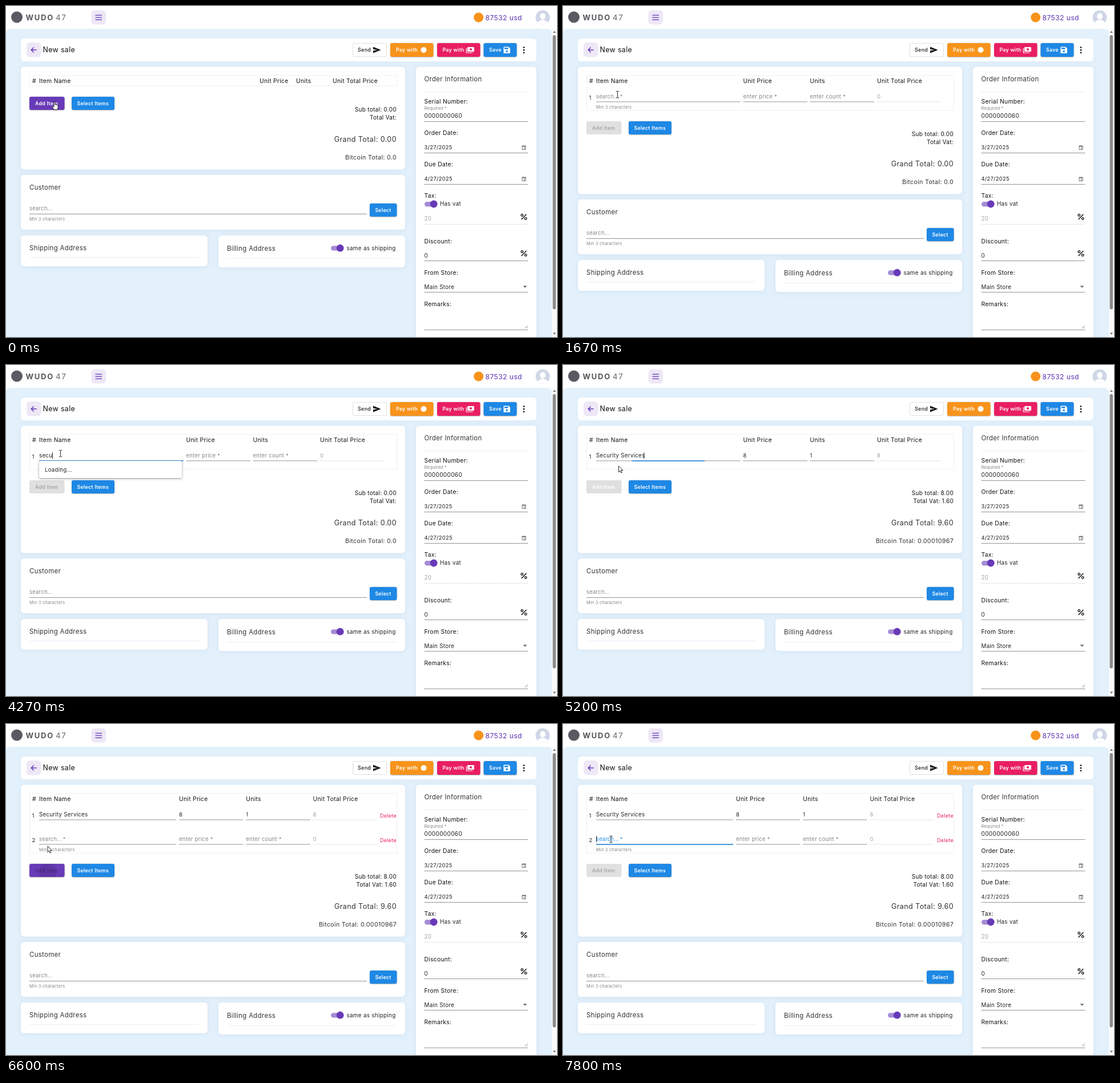
These frames come from a looping animation (965 px wide and 580 px high, 8 s). An HTML page:

```html
<!DOCTYPE html>
<html lang="en">
<head>
<meta charset="utf-8">
<title>New sale</title>
<style>
html, body { margin: 0; width: 100%; height: 100%; overflow: hidden; background: #fff; }
svg { display: block; }
text { font-family: Inter, "Open Sans", sans-serif; letter-spacing: .03em; white-space: pre; }
.card { fill: #fff; filter: drop-shadow(0 1px 5px rgba(32, 60, 100, .08)); }
.bar { fill: #fff; filter: drop-shadow(0 1px 4px rgba(32, 60, 100, .03)); }
.raised { filter: drop-shadow(0 1px .6px rgba(0, 0, 0, .2)) drop-shadow(0 .6px 1.4px rgba(0, 0, 0, .18)); }
.panel { fill: #fff; filter: drop-shadow(0 1.2px 1px rgba(0, 0, 0, .25)) drop-shadow(0 1px 2.4px rgba(0, 0, 0, .22)); }
</style>
</head>
<body>
<svg id="stage" width="965" height="580" viewBox="0 0 965 580">
  <g id="fixed"></g>
  <g id="live"></g>
</svg>
<script>
const LOOP = 8000;
const INK = '#212121', GREY = '#858585', PALE = '#a3a3a3', RULE = '#949494', FAINT = '#ebeef2';
const BLUE = '#1e88e5', PURPLE = '#673ab7', PINK = '#e91e63', ORANGE = '#f7931a';

// Moments of the story
const ADD1 = 930, FOCUS1 = 1930, TYPE = 2730, LIST = 4270, FOUND = 4400,
      PICK = 5200, ADD2 = 6600, FOCUS2 = 7470;
const TYPED = [[TYPE, 's', 63.5], [2870, 'se', 69.3], [3270, 'sec', 75], [LIST, 'secu', 81], [PICK, 'Security Services', 141.5]];
const CARET_ON = [[FOCUS1, 2530], [TYPE, 3800], [LIST, 4800], [PICK, 5730], [6270, ADD2], [FOCUS2, LOOP]];
const POINTER = [
  [0, 85, 168], [1270, 85, 168], [1400, 86, 167], [1600, 86, 167], [1670, 95.5, 155],
  [4600, 95.5, 155], [5000, 97.5, 177], [5930, 97, 176.5], [6400, 73, 214],
  [7060, 73, 214], [7200, 84, 202], [LOOP, 84, 202]
];

// Drawing helpers; text y is the middle of the line
const text = (x, y, s, size = 9.8, o = {}) =>
  `<text x="${x}" y="${y + size * .36}" font-size="${size}" font-weight="${o.w || 400}" fill="${o.c || INK}" text-anchor="${o.a || 'start'}"${o.ls ? ` style="letter-spacing:${o.ls}px"` : ''}>${s}</text>`;
const rect = (x, y, w, h, fill, r = 0, more = '') =>
  `<rect x="${x}" y="${y}" width="${w}" height="${h}" rx="${r}" fill="${fill}" ${more}/>`;
const card = (x, y, w, h, kind = 'card') => rect(x, y, w, h, '#fff', 6, `class="${kind}"`);
const path = (d, fill, more = '') => `<path d="${d}" fill="${fill}" ${more}/>`;
const stroke = (d, color, width = 1, more = '') =>
  path(d, 'none', `stroke="${color}" stroke-width="${width}" ${more}`);
const circle = (x, y, r, fill) => `<circle cx="${x}" cy="${y}" r="${r}" fill="${fill}"/>`;
const rule = (x1, x2, y, color = RULE) => stroke(`M${x1} ${y}H${x2}`, color);
const dots = (x1, x2, y) => stroke(`M${x1} ${y}H${x2}`, '#b5b5b5', 1, 'stroke-dasharray="1 1.9"');
const group = (x, y, s) => `<g transform="translate(${x} ${y})">${s}</g>`;
const label = (x, y, s) => text(x, y, s, 10.3, { c: '#111' });
const title = (x, y, s) => text(x, y, s, 11.4, { c: '#333' });
const hint = (x, y, s) => text(x, y, s, 7.4, { c: GREY });
const bold = (x, y, s, c = '#fff', a = 'start') => text(x, y, s, 8.8, { w: 600, c, a });
const button = (x, y, w, h, fill) => rect(x, y, w, h, fill, 3, 'class="raised"');
const toggle = (x, y) => rect(x, y - 4, 21, 8.4, '#a58bd6', 4.2) + circle(x + 16.2, y, 6.4, PURPLE);

const clamp = p => Math.max(0, Math.min(1, p));
const easeOut = (p, n) => 1 - (1 - clamp(p)) ** n;

const calendar = y => group(903.5, y - 4,
  stroke('M.5 1.4H6.7V7.6H.5Z', '#555', .8) + path('M.5 1.2H6.7V2.6H.5ZM1.4 0H2.2V2H1.4ZM5 0H5.8V2H5ZM3.6 4.4H5.4V6.2H3.6Z', '#555'));
const percent = y => group(907, y,
  stroke('M4.4 -4.6L-4.4 4.6', '#111', 1.4) + stroke('M-5 -3a1.8 1.8 0 1 0 3.6 0a1.8 1.8 0 1 0 -3.6 0M1.4 3a1.8 1.8 0 1 0 3.6 0a1.8 1.8 0 1 0 -3.6 0', '#111', 1.3));

function header() {
  return circle(19, 19.5, 10, '#5a5a62') +
    text(34.5, 20, 'WUDO', 13, { w: 700, c: '#55555d', ls: 1.8 }) +
    text(87, 20, '47', 13, { w: 500, c: '#77777f', ls: 1.8 }) +
    rect(149.5, 7.5, 25.5, 25, '#ede7f6', 6) +
    stroke('M156.5 16.2H168M156.5 20.2H168M156.5 24.2H168', '#5e35b1', 1.3) +
    circle(827.7, 20, 8.5, ORANGE) +
    text(839.5, 20.2, '87532 usd', 12.2, { c: '#5e35b1' }) +
    circle(940, 20, 12.5, '#cfd6e6') +
    `<ellipse cx="940" cy="18" rx="4.8" ry="5.8" fill="#fff"/>` +
    path('M931.5 29Q933 24.6 940 24.2Q947 24.6 948.5 29A12.5 12.5 0 0 1 931.5 29Z', '#fff');
}

function toolbar() {
  return card(26, 57, 903, 40, 'bar') +
    rect(36, 64, 25.5, 25.5, '#ede7f6', 6) +
    stroke('M53.5 77H44.5M48.6 72.6L44.2 77L48.6 81.4', '#5e35b1', 1.4) +
    text(64.5, 76.8, 'New sale', 12.4, { c: '#111' }) +
    rect(607.5, 65.5, 59, 23, '#fff', 2, 'stroke="#e0e0e0"') +
    text(616, 77, 'Send', 9, { w: 500 }) + path('M643 71.5L656.5 77L643 82.5V78.2L651 77L643 75.8Z', '#111') +
    button(673, 65, 75.5, 24, ORANGE) + bold(683, 77, 'Pay with') + circle(731.5, 77, 5, '#fff') +
    button(755, 65, 75.5, 24, PINK) + bold(764.5, 77, 'Pay with') +
    rect(808, 72, 12, 8, '#fff', 1) + circle(814, 76, 2.1, PINK) +
    stroke('M806.3 74V82H817.5', '#fff', 1.2) +
    button(836.5, 65, 58, 24, BLUE) + bold(846, 77, 'Save') +
    path('M872.6 71.4H880.2L883 74.2V82.8H871.4V72.6Z', '#fff') +
    rect(873, 73, 6.4, 2.6, BLUE) + circle(877.2, 79.3, 1.8, BLUE) +
    [72.6, 77.2, 81.8].map(y => circle(907, y, 1.4, '#111')).join('');
}

function order() {
  const x = 732.5, end = 914.5;
  return card(718, 106.5, 211, 500) +
    title(x, 128, 'Order Information') + rule(x, end, 150.5, FAINT) +
    label(x, 167.5, 'Serial Number:') + hint(x, 179, 'Required *') +
    text(x, 192.5, '0000000060', 10.1) + rule(x, end, 202.5) +
    label(x, 222.5, 'Order Date:') + text(x, 247.5, '3/27/2025', 9.4) + calendar(248) + rule(x, end, 257.5) +
    label(x, 277.5, 'Due Date:') + text(x, 302.5, '4/27/2025', 9.4) + calendar(303) + rule(x, end, 312.5) +
    label(x, 332.5, 'Tax:') + toggle(733, 347) + text(760, 346.8, 'Has vat') +
    text(x, 372.7, '20', 9.8, { c: PALE }) + percent(369.5) + dots(x, end, 382.5) +
    label(x, 412, 'Discount:') + text(x, 437, '0', 9.8) + percent(433.5) + rule(x, end, 446.5) +
    label(x, 467, 'From Store:') + text(x, 492, 'Main Store', 9.8) +
    path('M905.6 490.2H912.4L909 493.8Z', '#666') + rule(x, end, 501.5) +
    label(x, 522, 'Remarks:') + stroke('M908.6 565L913.6 560M911.4 565L913.6 562.8', '#777', .8) + rule(x, end, 567.5);
}

document.getElementById('fixed').innerHTML =
  rect(0, 0, 965, 580, '#fff') +
  path('M0 580V48Q0 40 8 40H948Q956 40 956 48V580Z', '#e3f1fc') +
  rect(956, 40, 9, 540, '#fafafa') +
  rect(957.5, 51, 5.6, 480.5, '#8b8b8b', 2.8) +
  path('M957.8 47L960.5 43.4L963.2 47ZM957.8 572.5H963.2L960.5 576.1Z', '#777') +
  header() + toolbar() + order();

// Column starts: name, price, units, total; and field ends
const EMPTY = { at: [58, 444, 508, 572] };
const SINGLE = { at: [58, 315.5, 432.5, 550], to: [310.5, 428, 545, 662] };
const DOUBLE = { at: [58, 303, 420.3, 537.5], to: [298, 415.3, 532.5, 648.5] };

function row(n, y, cols, r) {
  const { at, to } = cols;
  const soft = s => ({ c: s ? INK : GREY });
  const tint = { c: r.focus >= 0 ? BLUE : GREY };
  let s = text(45.5, y + 2.3, n, 9.6) + rule(at[0], to[0], y + 9.7);
  if (r.name) s += text(at[0], y, r.name, 9.7);
  else s += text(at[0], y, 'search...', 9.2, tint) + text(99.8, y, '*', 9.2, tint) +
    hint(at[0], y + 19, 'Min 3 characters');
  s += text(at[1], y, r.price || 'enter price *', 9.5, soft(r.price)) + rule(at[1], to[1], y + 9.7);
  s += text(at[2], y, r.units || 'enter count *', 9.5, soft(r.units)) + rule(at[2], to[2], y + 9.7);
  s += text(at[3], y, r.price || '0', 9.5, { c: PALE }) + dots(at[3], to[3], y + 9.7);
  if (cols === DOUBLE) s += text(655, y + 2.7, 'Delete', 9, { c: PINK });
  if (r.focus >= 0) {
    const half = (to[0] - at[0]) / 2 * (.5 + .5 * easeOut(r.focus / 300, 3)), mid = (at[0] + to[0]) / 2;
    s += stroke(`M${mid - half} ${y + 9.8}H${mid + half}`, BLUE, 1.5);
  }
  if (r.caret) s += rect(r.caret, y - 5, 1, 11, '#222');
  return s;
}

// How far the Add button has faded to its disabled look
function fade(t) {
  if (t >= ADD2) return easeOut((t - ADD2) / 400, 2);
  if (t >= PICK) return 1 - easeOut((t - PICK) / 300, 2);
  return easeOut((t - ADD1) / 400, 2);
}

function addButton(t, y) {
  const f = fade(t), off = (t >= ADD1 && t < PICK) || t >= ADD2;
  const mix = (a, b) => Math.round(a + (b - a) * f);
  const fill = `rgb(${mix(103, 224)},${mix(58, 224)},${mix(183, 224)})`;
  const [since, cx, cy] = t >= ADD2 ? [t - ADD2, 32, 14] : [t - ADD1, 44, 11];
  let wave = '';
  if (since >= 0 && since < 450)
    wave = circle(cx, cy, 15 + 50 * easeOut(since / 225, 2), `rgba(0,0,0,${.1 * (1 - since / 450)})`);
  return rect(41, y, 61.5, 23, fill, 3, f < .6 ? 'class="raised"' : '') +
    `<svg x="41" y="${y}" width="61.5" height="23">${wave}</svg>` +
    bold(51, y + 11.5, 'Add Item', off ? 'rgba(0,0,0,.26)' : '#fff');
}

function cursor(t) {
  const i = POINTER.findIndex(p => p[0] > t), [t0, x0, y0] = POINTER[i - 1], [t1, x1, y1] = POINTER[i];
  const p = (t - t0) / (t1 - t0), k = p * p * (3 - 2 * p);
  const x = x0 + (x1 - x0) * k, y = y0 + (y1 - y0) * k;
  const edge = 'stroke="#111" stroke-width=".9" stroke-linejoin="round"';
  const beam = (t >= ADD1 && t < PICK && y < 167) || (t > 7000 && y < 211);
  const hand = t < ADD1 || (t > 4600 && t < PICK) || (t >= 6000 && t < ADD2 && y > 202);
  if (beam) return group(x, y,
    stroke('M-2.6 -5.6H-.7L0 -5L.7 -5.6H2.6M0 -5V5M-2.6 5.6H-.7L0 5L.7 5.6H2.6', '#222', 1));
  if (hand) return group(x, y, path(
    'M-1 1Q-1 -.2 0 -.2T1 1V5Q1.2 4.2 2 4.4T2.8 5.4Q3.2 4.7 3.9 5T4.5 6Q5 5.4 5.6 5.8T6.2 7V9.5L5 13.8H-.8L-3.6 9.2Q-4.2 7.8 -3.2 7.5T-1 9Z', '#fff', edge));
  return group(x, y, path('M0 0V10.6L2.5 8.3L4.2 12L5.9 11.2L4.3 7.6H7.6Z', '#fff', edge));
}

function items(t, d) {
  const cols = t < ADD1 ? EMPTY : t < ADD2 ? SINGLE : DOUBLE;
  const picked = t >= PICK;
  const last = TYPED.filter(k => t >= k[0]).pop();
  const blink = CARET_ON.some(([a, b]) => t >= a && t < b);
  let s = card(26, 106.5, 673, 180 + d) +
    rect(41.5, 121.5, 643, 18.5 + d, 'none', 0, 'stroke="#f0f0f0"') + label(46, 130.8, '#') +
    ['Item Name', 'Unit Price', 'Units', 'Unit Total Price'].map((h, i) => label(cols.at[i], 130.8, h)).join('');
  if (t >= ADD1) s += row(1, 158.2, cols, {
    name: last && last[1], price: picked && '8', units: picked && '1',
    focus: t < ADD2 ? t - (picked ? PICK : FOCUS1) : -1,
    caret: blink && t < ADD2 && (last ? last[2] : 58)
  });
  if (t >= ADD2) s += row(2, 201.2, cols, { focus: t - FOCUS2, caret: blink && 58 });
  const sum = (y, str, size, c = '#333') => text(684, y + d, str, size, { a: 'end', c });
  return s + addButton(t, 159 + d) +
    button(115, 159 + d, 75, 23, BLUE) + bold(124.5, 170.5 + d, 'Select Items') +
    sum(181.3, 'Sub total: ' + (picked ? '8.00' : '0.00'), 10, '#111') +
    sum(195.7, 'Total Vat:' + (picked ? ' 1.60' : ''), 10, '#111') +
    sum(233.2, 'Grand Total: ' + (picked ? '9.60' : '0.00'), 12.6) +
    sum(264.7, 'Bitcoin Total: ' + (picked ? '0.00010967' : '0.0'), 10.7);
}

function lower() {
  return card(26, 296, 673, 96) + title(41, 317.5, 'Customer') +
    text(41, 355, 'search...', 9.4, { c: GREY }) + rule(41, 632, 364.5) + hint(41, 373.7, 'Min 3 characters') +
    button(637, 346, 47.5, 23, BLUE) + bold(660.5, 357.5, 'Select', '#fff', 'middle') +
    card(26, 402, 327, 54) + title(41, 423.5, 'Shipping Address') + rule(41, 338.5, 440.5, '#e6f1fa') +
    card(372, 402, 327, 56) + title(387, 424.8, 'Billing Address') + rule(387, 684.5, 442.5, '#e6f1fa') +
    toggle(569, 424.2) + text(596.5, 424.2, 'same as shipping', 9.9);
}

function dropdown(t) {
  if (t < LIST || t >= PICK) return '';
  const found = t >= FOUND;
  return rect(58, 168, 250, 30, '#fff', 2, 'class="panel"') +
    (found ? rect(58, 168, 250, 30, '#f5f5f5', 2) : '') +
    text(68, 183.3, found ? 'Security Services' : 'Loading...', 9.6);
}

const live = document.getElementById('live');
let shown = '';
function draw(t) {
  const d = t < ADD1 ? 0 : t < ADD2 ? 43 : 86;
  const s = items(t, d) + group(0, d, lower()) + dropdown(t) + cursor(t);
  if (s !== shown) live.innerHTML = shown = s;
}

const start = performance.now();
function tick(now) {
  draw(Math.max(0, now - start) % LOOP);
  requestAnimationFrame(tick);
}
draw(0);
requestAnimationFrame(tick);
</script>
</body>
</html>
```
